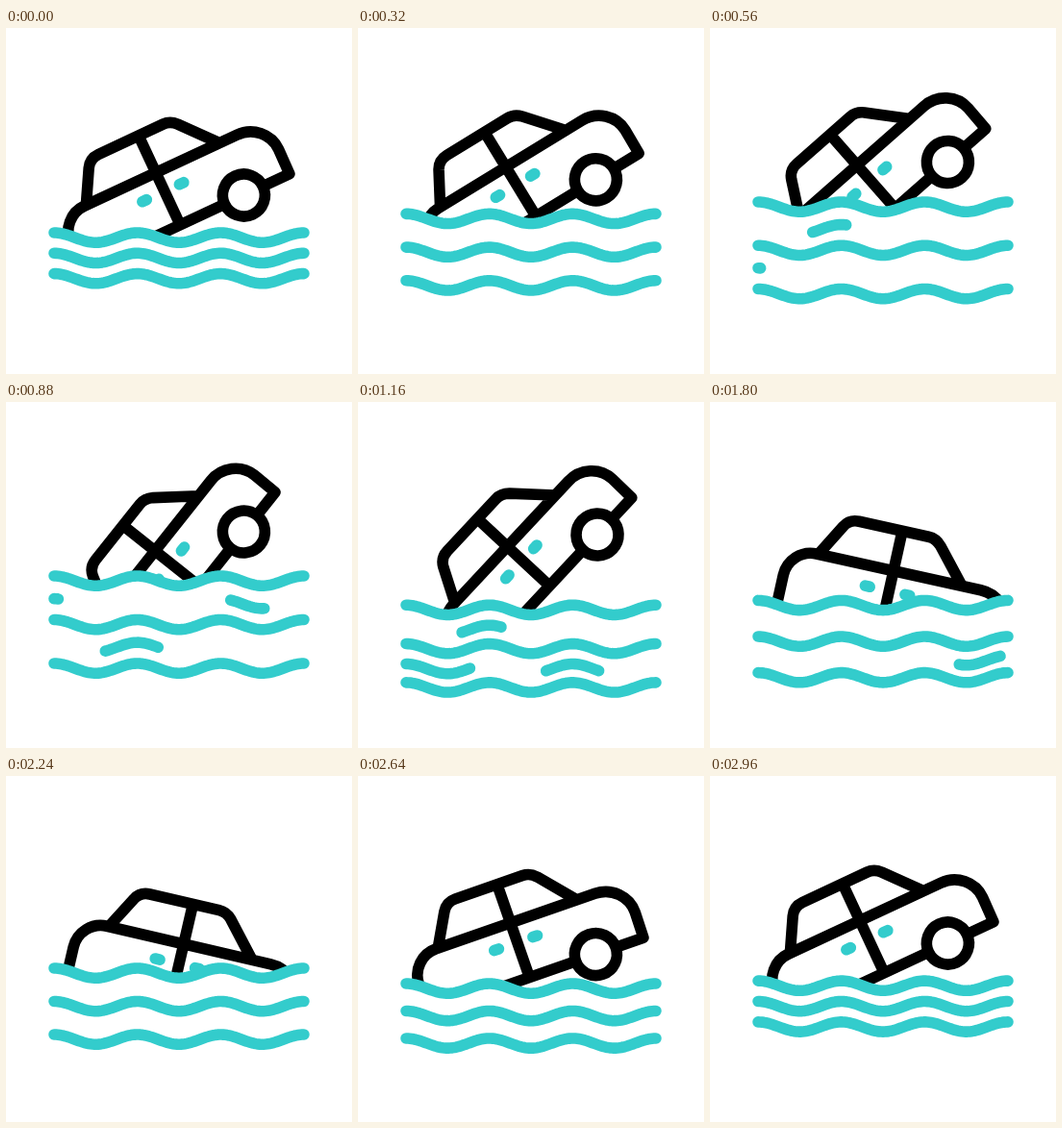
Animation of 360x360 px, one loop 3000 ms. Source, as an HTML page with a canvas:

```html
<!DOCTYPE html>
<html>
<head>
<meta charset="utf-8">
<style>
html, body { margin: 0; height: 100%; overflow: hidden; background: #fff; }
canvas { display: block; }
</style>
</head>
<body>
<canvas id="stage" width="360" height="360"></canvas>
<script>
const ctx = document.getElementById('stage').getContext('2d');
const LOOP = 3000, LEFT = 50, RIGHT = 310, PERIOD = (RIGHT - LEFT) / 3;
const TEAL = '#33cccc';

const ease = s => (1 - Math.cos(Math.PI * Math.min(Math.max(s, 0), 1))) / 2;

// A start value plus eased moves, each given as [from, to, change]
const track = (start, ...moves) => t =>
  moves.reduce((v, [from, to, change]) => v + change * ease((t - from) / (to - from)), start);

// Car: front wheel position and tilt in degrees
const carX = track(247.4, [1000, 1480, 6.4], [1480, 2220, -11.4], [2220, 2640, 5]);
const carY = track(174, [0, 720, -39], [1090, 1780, 115], [2220, 2785, -76]);
const tilt = track(-25, [0, 1000, -27.5], [1000, 1860, 65.7], [2220, 2785, -38.2]);

// Water: height of the top wave and distance between waves
const level = track(213, [0, 560, -32], [880, 1250, 35], [1480, 2050, -16], [2240, 2640, 16], [2640, 3000, -3]);
const spread = track(21.3, [0, 600, 24.2], [880, 1250, -6], [1480, 2240, -5], [2320, 3000, -13.2]);

// Short ripples running right between the waves
const ripples = [
  { row: 0, start: 330, speed: 0.397, length: 35 },
  { row: 0, start: 868, speed: 0.338, length: 41 },
  { row: 1, start: 553, speed: 0.33, length: 55 },
  { row: 1, start: 962, speed: 0.334, length: 71 }
];

function traceWave(y, from, to) {
  for (let x = from; ; x = Math.min(x + 2, to)) {
    ctx.lineTo(x, y + 5.1 * (1 - Math.cos(2 * Math.PI * (x - LEFT) / PERIOD)));
    if (x >= to) break;
  }
}

function wave(y, from = LEFT, to = RIGHT) {
  ctx.beginPath();
  traceWave(y, from, to);
  ctx.stroke();
}

const body = new Path2D(
  'M-184 0V-31A29 29 0 0 1 -155 -60H20A33 32 0 0 1 53 -28L52.5 0H-110' +
  'M-153 -60L-134 -94Q-129 -102.5 -119 -102.5H-45Q-37 -102.5 -31 -96L0 -60' +
  'M-73 -102V0');
const handles = new Path2D('M-98.5 -38.5h5M-56 -38.5h5');
const wheel = new Path2D('M22 0A22 22 0 1 1 -22 0A22 22 0 1 1 22 0Z');

// The car shows only above the top wave
function car(t, water) {
  ctx.save();
  ctx.beginPath();
  ctx.moveTo(0, 0);
  ctx.lineTo(0, water);
  traceWave(water, LEFT, RIGHT);
  ctx.lineTo(360, water);
  ctx.lineTo(360, 0);
  ctx.clip();
  ctx.translate(carX(t), carY(t));
  ctx.rotate(tilt(t) * Math.PI / 180);
  ctx.strokeStyle = '#000';
  ctx.stroke(body);
  ctx.fill(wheel);
  ctx.stroke(wheel);
  ctx.strokeStyle = TEAL;
  ctx.stroke(handles);
  ctx.restore();
}

function draw(t) {
  const water = level(t), gap = spread(t);
  ctx.fillStyle = '#fff';
  ctx.fillRect(0, 0, 360, 360);
  ctx.lineWidth = 11.6;
  ctx.lineCap = ctx.lineJoin = 'round';
  car(t, water);
  ctx.strokeStyle = TEAL;
  for (let i = 0; i < 3; i++) wave(water + i * gap);
  for (const { row, start, speed, length } of ripples) {
    const end = RIGHT - 8, head = LEFT + (t - start) * speed, tail = head - length;
    if (head > LEFT && tail < end)
      wave(water + (row + 0.52) * gap, Math.max(tail, LEFT), Math.min(head, end));
  }
}

const begin = performance.now();
function tick() {
  draw((performance.now() - begin) % LOOP);
  requestAnimationFrame(tick);
}
tick();
</script>
</body>
</html>
```
